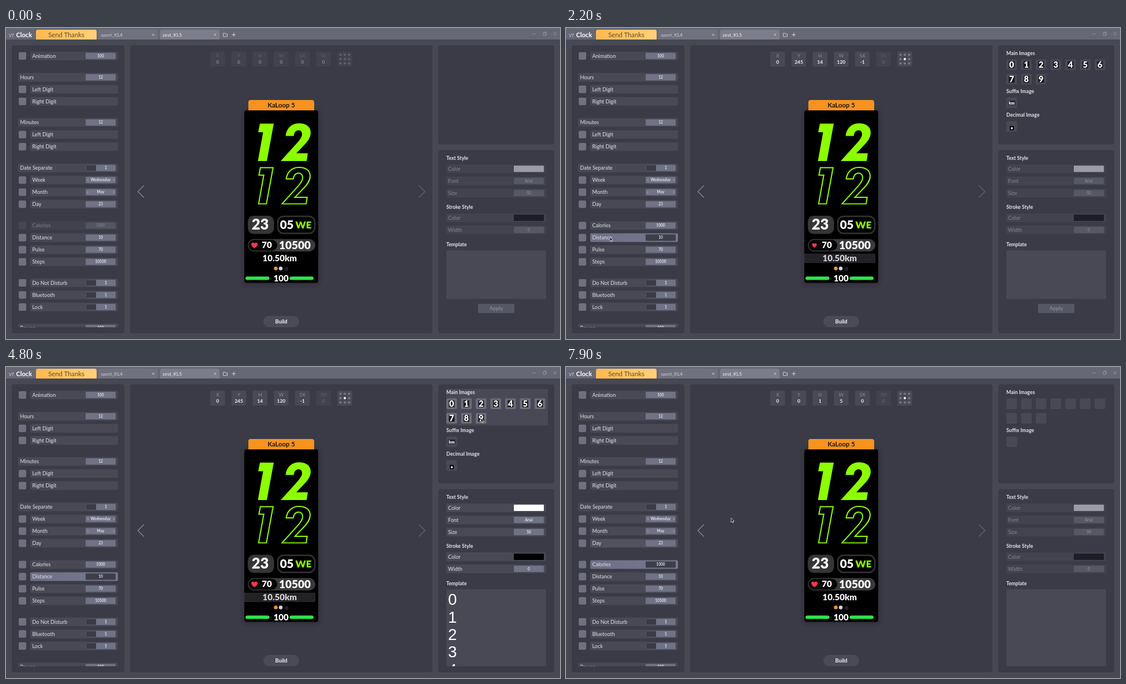
Recreate the animation shown at these times as an HTML page. Size 960x540 px, loop 8000 ms.

```html
<!DOCTYPE html>
<html lang="en">
<head>
<meta charset="utf-8">
<title>Watch face editor</title>
<style>
html, body { margin: 0; width: 100%; height: 100%; overflow: hidden; background: #474853; }
svg { display: block; width: 960px; height: 540px; font-family: Lato, "Open Sans", sans-serif; }
</style>
</head>
<body>
<svg id="stage" viewBox="0 0 960 540" xmlns="http://www.w3.org/2000/svg">
  <defs>
    <linearGradient id="gold"><stop offset="0" stop-color="#ffb94f"/><stop offset="1" stop-color="#ffd078"/></linearGradient>
    <linearGradient id="pick"><stop offset="0" stop-color="#6e7086"/><stop offset="1" stop-color="#75778d"/></linearGradient>
    <filter id="soft" x="-20%" y="-10%" width="140%" height="120%"><feGaussianBlur stdDeviation="4"/></filter>
    <clipPath id="listClip"><rect x="10" y="30" width="195" height="489.5"/></clipPath>
    <clipPath id="sideClip"><rect x="749" y="212" width="201" height="307.5"/></clipPath>
    <clipPath id="glyphClip"><path id="glyphs"/></clipPath>
  </defs>
  <g id="base"></g>
  <g id="live"></g>
</svg>
<script>
const LOOP = 8000, STEP = 100;
const PANEL = '#3a3b46', ROW = '#484955', BOX = '#707285', INK = '#e3e3e9', DIM = '#7c7e8b', LIME = '#8cff00';
const base = document.getElementById('base'), live = document.getElementById('live');

const rect = (x, y, w, h, fill, r = 0, extra = '') =>
  `<rect x="${x}" y="${y}" width="${w}" height="${h}" rx="${r}" fill="${fill}" ${extra}/>`;
const path = (d, stroke, width = 1, fill = 'none', extra = '') =>
  `<path d="${d}" stroke="${stroke}" stroke-width="${width}" fill="${fill}" ${extra}/>`;
const dot = (x, y, r, fill) => `<circle cx="${x}" cy="${y}" r="${r}" fill="${fill}"/>`;
const text = (x, y, s, size, fill = INK, weight = 400, anchor = 'start', extra = '') =>
  `<text x="${x}" y="${y}" font-size="${size}" fill="${fill}" font-weight="${weight}" text-anchor="${anchor}" ${extra}>${s}</text>`;
const mid = (x, y, s, size, fill = INK, weight = 700) => text(x, y, s, size, fill, weight, 'middle');

// [centre y, label, value, kind]: h = heading, t = heading with switch, s = switch, p = picker
const rows = [
  [48.5, 'Animation', '100'],
  [85.5, 'Hours', '12', 'h'], [106.5, 'Left Digit'], [127.5, 'Right Digit'],
  [164, 'Minutes', '12', 'h'], [185, 'Left Digit'], [206, 'Right Digit'],
  [243, 'Date Separate', '1', 't'],
  [264, 'Week', 'Wednesday', 'p'], [285, 'Month', 'May', 'p'], [306, 'Day', '23'],
  [343, 'Calories', '1000'], [364, 'Distance', '10'], [385, 'Pulse', '70'], [406, 'Steps', '10500'],
  [442.5, 'Do Not Disturb', '1', 's'], [463.5, 'Bluetooth', '1', 's'], [484.5, 'Lock', '1', 's'],
  [521, 'Power', '100', 'h']
];

// Pointer stops: [ms, x, y]
const stops = [
  [100, 180, 400], [500, 29, 342], [700, 29, 342], [1000, 71, 345], [1500, 71, 345],
  [1800, 76, 363], [2400, 76, 363], [2800, 254.5, 320], [3400, 771, 67], [3900, 771, 67],
  [4400, 824, 88], [4600, 823, 89], [5200, 823, 89], [5800, 900, 66], [6300, 918, 108],
  [6600, 900, 95], [7100, 51, 348], [7200, 8, 350], [7400, 62, 343], [7500, 62, 343], [8000, 342, 242]
];

function pointer(t) {
  if (t < stops[0][0]) return null;
  const i = stops.findIndex(s => s[0] > t);
  const [t0, x0, y0] = stops[i - 1], [t1, x1, y1] = stops[i];
  let k = (t - t0) / (t1 - t0);
  if (t1 < LOOP && t0 !== 2400) k = k * k * (3 - 2 * k);
  return [x0 + (x1 - x0) * k, y0 + (y1 - y0) * k];
}

// The highlight lags the pointer and fades after it
function hover(t, y) {
  const over = ago => {
    const p = pointer(t - ago);
    return p && p[0] > 42 && p[0] < 194 && Math.abs(p[1] - y) < 8;
  };
  return over(100) ? 0.08 : over(200) ? 0.05 : 0;
}

function row([y, label, value, kind], t, picked, off) {
  const head = kind === 'h' || kind === 't', top = y - 7.5;
  const x = head ? 21 : 42, ink = off ? DIM : INK;
  let s = rect(x, top, 194 - x, 15, picked ? 'url(#pick)' : off ? '#41424d' : ROW, 2);
  if (!head) {
    s += rect(22, y - 6.5, 13, 13, off ? '#464752' : '#6f7181', 2);
    const glow = hover(t, y);
    if (glow && !picked) s += rect(x, top, 152, 15, '#fff', 2, `opacity="${glow}"`);
  }
  s += text(head ? 24.5 : 45.5, y + 3.1, label, 9, ink);
  if (!value) return s;
  const onOff = kind === 's' || kind === 't';
  if (onOff) s += rect(138.5, y - 5, 18, 10, PANEL, 1, 'stroke="#5d5f6d" stroke-width=".7"');
  s += rect(onOff ? 156 : 138, y - 5.5, onOff ? 34 : 52, 11, picked ? '#3d3e4a' : off ? '#535561' : BOX, 1);
  s += mid(onOff ? 173 : 164, y + 2.4, value, 6.6, ink);
  if (kind === 'p') s += mid(142, y + 2, '‹', 6.5) + mid(187, y + 2, '›', 6.5);
  return s;
}

function coordBar(values) {
  const on = !!values;
  let s = '';
  ['X', 'Y', 'H', 'W', 'SX', 'SY'].forEach((name, i) => {
    const use = on && i < 5, x = 354 + i * 36.7;
    s += rect(x, 41, 25.5, 26, use ? ROW : '#41424d', 2);
    s += mid(x + 12.8, 51.3, name, 8, use ? '#8c8e9b' : '#60626f', 400);
    s += mid(x + 12.8, 62.2, on ? values[i] : 0, 8.4, use ? '#f3f3f6' : on ? '#60626f' : '#858794');
  });
  s += rect(574.3, 41, 25.7, 26, on ? ROW : '#41424d', 2);
  for (let i = 0; i < 9; i++)
    s += dot(579.6 + i % 3 * 7.5, 46.5 + Math.floor(i / 3) * 7.5, 2, on ? (i === 4 ? '#fff' : '#777987') : '#5f616e');
  return s;
}

function imagePanel(mode, chosen, group) {
  if (!mode) return '';
  const full = mode === 'Distance';
  const head = (y, s) => text(763, y, s, 8.8, INK, 700);
  const tile = (x, y, hot) => rect(x, y, 18.5, 18.5, hot ? '#6b6d7b' : ROW, 2);
  let s = group ? rect(763, 38, 176, 63.5, ROW, 2) : '';
  s += head(47.3, 'Main Images') + head(113.3, 'Suffix Image');
  for (let i = 0; i < 10; i++) {
    const x = 763 + i % 7 * 25.5, y = i < 7 ? 54.5 : 79.7;
    s += tile(x, y, full && i < chosen);
    if (full) s += rect(x + 4.3, y + 3.3, 10, 12, '#17181d') + mid(x + 9.3, y + 14.3, i, 14.5, '#fff', 900);
  }
  s += tile(763, 120.5);
  if (full) {
    s += rect(766, 126, 12.5, 8, '#25262d') + mid(772.3, 132.5, 'km', 7.2, '#fff', 900);
    s += head(154.3, 'Decimal Image') + tile(763, 161.7);
    s += rect(769, 170, 7, 7.5, '#08080b') + rect(771, 172.5, 3, 3, '#fff');
  }
  return s;
}

function stylePanel(lines, tall) {
  const on = lines > 0, ink = on ? INK : '#858793';
  const head = (y, s) => text(763, y + 3.1, s, 8.7, INK, 700);
  const field = (y, label, fill, value) =>
    rect(763, y - 7.5, 173, 15, on ? ROW : '#42434e', 2) + text(766, y + 3.1, label, 9, ink) +
    rect(880, y - 5.5, 52, 11, fill, 1) + (value ? mid(906, y + 2.4, value, 6.6, ink) : '');
  const pale = on ? BOX : '#565864';
  let s = head(226, 'Text Style') + field(244.5, 'Color', on ? '#fff' : '#9a9ba4') +
    field(265.5, 'Font', pale, 'Arial') + field(286.5, 'Size', pale, '50') +
    head(311, 'Stroke Style') + field(329.5, 'Color', on ? '#000' : '#1c1d26') +
    field(350.5, 'Width', pale, '0') + head(375.5, 'Template');
  const long = tall || lines > 1, height = long ? 134 : on ? 57.5 : 84.5;
  s += rect(763, 386, 173, height, ROW, 2);
  for (let i = 0; i < Math.min(lines, 5); i++)
    s += text(766, 413.4 + i * 30.3, i, 27.5, '#fff', 400, 'start', 'font-family="Liberation Sans, Arial, sans-serif"');
  if (!long) {
    const y = 386 + height + 8.5;
    s += rect(818, y, 63, 16, on ? '#686a7b' : '#555764', 2) + mid(849.5, y + 11.2, 'Apply', 9.2, on ? INK : '#92949f', 400);
  }
  return `<g clip-path="url(#sideClip)">${s}</g>`;
}

const one = 'M440 166H464L452 231H436.500L445.500 181H437Z';
const two = 'M476 231L504 200C510 193 513 189 513 184.500C513 180 510.500 177.500 507 177.500C502.500 177.500 499.500 181 498.500 187.500H484.500' +
  'C486 173.500 495 165.500 508 165.500C520 165.500 528 171.500 528 181.500C528 190 523 197 515 205L503 217.500H523L521 231Z';
document.getElementById('glyphs').setAttribute('d', one + two);

function watch() {
  let s = rect(413, 145, 128, 299, '#1c1d24', 4, 'filter="url(#soft)" opacity=".6"');
  s += path('M420 144V129Q420 125 424 125H530Q534 125 534 129V144Z', 'none', 0, '#f7931e');
  s += mid(477, 137.9, 'KaLoop 5', 11.3, '#1b1510');
  s += rect(413, 143, 128, 299.5, '#000', 4);
  s += path(one + two, 'none', 0, LIME);
  // Stroke clipped to the glyph keeps the outline inside its edge
  s += path(one + two, LIME, 4, 'none', 'transform="translate(0 75.5)" clip-path="url(#glyphClip)"');
  s += rect(419, 326, 45.5, 31.5, '#363638', 10) + mid(440.6, 350.3, '23', 25.5, '#fff', 900);
  s += rect(471, 327, 64, 29.5, '#000', 10, 'stroke="#343436" stroke-width="2.4"');
  s += mid(486.6, 348.7, '05', 20.5, '#fff', 900) + mid(515.5, 348.3, 'WE', 17, LIME, 900);
  s += rect(419, 366.5, 117, 21.5, '#3a3a3c', 10.7) + rect(420.5, 368, 49.5, 18.5, '#050505', 9.2);
  s += mid(452, 381.9, '70', 15, '#fff', 900) + mid(500.5, 383.8, '10500', 19, '#fff', 900);
  s += dot(467.5, 417.5, 3.2, '#f5962a') + dot(476, 417.5, 3.2, '#d4d8e0') + dot(486, 418.5, 3.2, '#202022');
  s += rect(415, 431.5, 41.5, 6, '#2be64a', 3) + rect(491.5, 431.5, 41.5, 6, '#2be64a', 3);
  return s + mid(476.7, 439.9, '100', 15, '#fff', 900);
}

function heart(t) {
  const phase = t % 1600, small = phase >= 400 && phase < 1250, fading = phase >= 650 && phase < 850;
  return path('M0 5.3C-3 2.8-5.5.8-5.5-1.8C-5.5-5.3-1.5-5.8 0-3C1.5-5.8 5.5-5.3 5.5-1.8C5.5.8 3 2.8 0 5.3Z',
    'none', 0, '#f0394f', `transform="translate(430.5 377.3) scale(${small ? 0.74 : 1})" opacity="${fading ? 0.55 : 1}"`);
}

function distance(picked) {
  return (picked ? rect(413.5, 392.5, 122, 15, '#222226', 0, 'stroke="#303033" stroke-width=".8"') : '') +
    mid(474.3, 405.3, '10.50km', 15, picked ? '#cfcfd2' : '#f4f4f4', 900);
}

function frame() {
  let s = rect(0, 0, 960, 540, '#474853') + rect(0, 0, 960, 20, '#676876');
  s += text(5, 15.5, 'VT', 7.2, '#d5d6dd') + text(17.5, 15.5, 'Clock', 11, '#fff', 700);
  s += path('M52 20V6Q52 3 55 3H154Q157 3 157 6V20Z', 'none', 0, 'url(#gold)') + mid(104.5, 15.6, 'Send Thanks', 11.3, '#6a4a20', 400);
  const tab = (x, fill, name, ink) =>
    path(`M${x} 20V6q0-3 3-3h97q3 0 3 3V20Z`, 'none', 0, fill) + text(x + 4.5, 14.5, name, 8.4, ink) +
    path(`M${x + 93.5} 10l3.4 3.4m0-3.4l-3.4 3.4`, '#d6d7de', 0.9);
  s += tab(160, '#70727f', 'sport_KL4', '#cdced6') + tab(267, '#7b7d8b', 'zest_KL5', '#f2f2f5');
  s += path('M376.5 9h2.5l1 1.3h3.5v4.5h-7Z', '#d5d6dd', 0.9) + path('M391.5 11.7h6.5m-3.25-3.25v6.5', '#d5d6dd', 1);
  s += path('M912 10.5h6M930.5 8.5h4.5v4.5h-4.5ZM932 8.5V7h4.5v4.5H935M948.5 7l5.5 6m0-6l-5.5 6', '#9395a2', 0.9);
  [[10, 30, 195, 500], [215, 30, 524, 500], [749, 30, 201, 172], [749, 212, 201, 318]]
    .forEach(([x, y, w, h]) => { s += rect(x, y, w, h, PANEL, 4); });
  s += path('M239 273.5L228.5 284L239 294.5', '#8b8d99', 1.1) + path('M715.5 273.5L726 284L715.5 294.5', '#656774', 1.1);
  s += rect(446, 500, 62, 19.5, '#4a4b57', 9.7) + mid(477, 513.2, 'Build', 9.2, '#f2f2f5');
  return s + watch();
}

function cursor(t) {
  const p = pointer(t);
  return p ? path('M0 0V7.2L1.7 5.7L2.9 8.3L4.2 7.7L3 5.2H5.2Z', '#e4e4ea', 0.8, '#15151a',
    `transform="translate(${p[0]} ${p[1]})"`) : '';
}

function draw(t) {
  const far = t >= 1900 && t < 7500;
  const picked = far ? 'Distance' : t >= 1000 ? 'Calories' : '';
  const lines = !far || t < 3700 ? 0 : t < 4500 ? 1 : 10;
  const coords = far ? [0, 245, 14, 120, -1, 0] : picked ? [0, 0, 1, 5, 0, 0] : null;
  const list = rows.map(r => row(r, t, r[1] === picked, r[1] === 'Calories' && t < 500)).join('');
  live.innerHTML = `<g clip-path="url(#listClip)">${list}</g>` + coordBar(coords) +
    heart(t) + distance(far) + imagePanel(picked, lines, t >= 4800 && t < 6200) +
    stylePanel(lines, t >= 7500) + cursor(t);
}

base.innerHTML = frame();
let last = -1;
const start = performance.now();
function tick() {
  const t = Math.floor((performance.now() - start) % LOOP / STEP) * STEP;
  if (t !== last) draw(last = t);
  requestAnimationFrame(tick);
}
tick();
</script>
</body>
</html>
```
